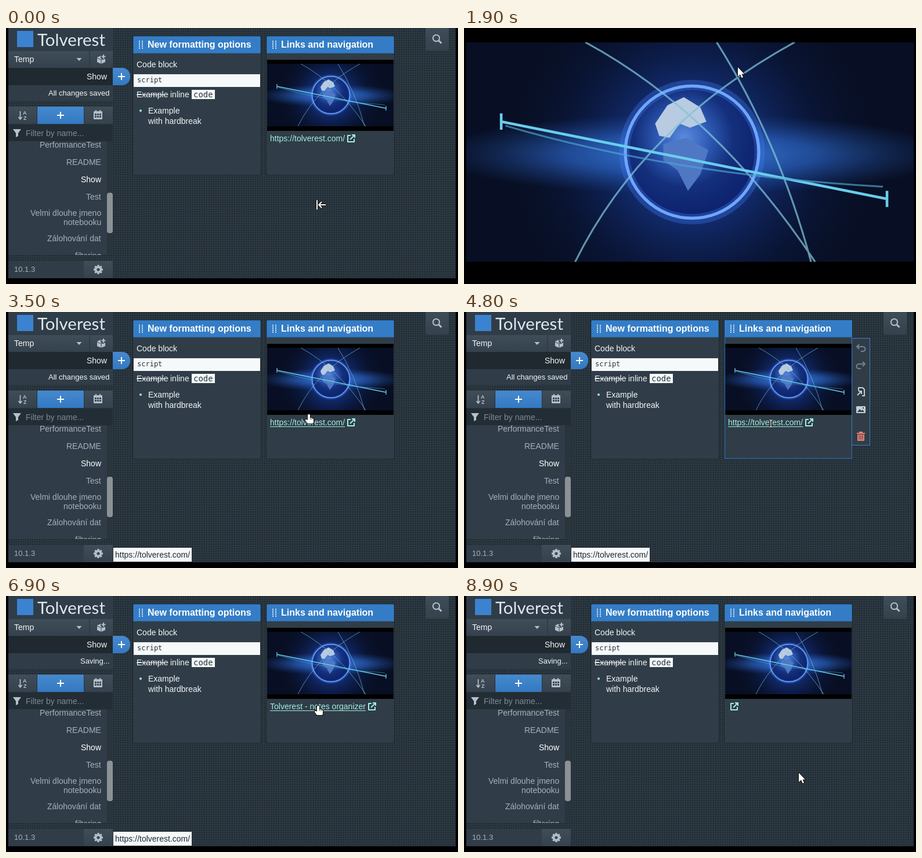
Write an HTML page with a canvas that moves like this. It is 779x443 px and loops after 9.8 s.

```html
<!DOCTYPE html>
<html lang="en">
<head>
<meta charset="utf-8">
<title>Notes</title>
<style>
html, body { margin: 0; width: 100%; height: 100%; overflow: hidden; background: #000; }
canvas { display: block; width: 779px; height: 443px; }
</style>
</head>
<body>
<canvas id="stage" width="779" height="443"></canvas>
<script>
const ctx = document.getElementById('stage').getContext('2d');
const LOOP = 9800, STEP = 100;
const SANS = '"Liberation Sans", Arial, sans-serif';
const MONO = '"DejaVu Sans Mono", monospace';
const URL_TEXT = 'https://tolverest.com/';
const C = {
  panel: '#303d48', button: '#3a4753', dark: '#20292f', blue: '#347dc6', text: '#f2f5f7',
  muted: '#a5b0b9', icon: '#b4c0ca', mint: '#a2eee0', paper: '#f5f9fa', red: '#e87f75'
};

// ---------- helpers ----------
function rect(x, y, w, h, fill, radius = 0) {
  ctx.fillStyle = fill;
  ctx.beginPath();
  ctx.roundRect(x, y, w, h, radius);
  ctx.fill();
}

function frame(x, y, w, h, color) {
  ctx.strokeStyle = color;
  ctx.lineWidth = 1;
  ctx.strokeRect(x + .5, y + .5, w - 1, h - 1);
}

function text(str, x, y, color = C.text, size = 14, align = 'left', family = SANS, weight = '') {
  ctx.font = `${weight} ${size}px ${family}`;
  ctx.fillStyle = color;
  const w = ctx.measureText(str).width;
  ctx.fillText(str, align === 'right' ? Math.round(x - w) : x, y);
  return w;
}

function shape(d, x, y, { fill, stroke, width = 2 }) {
  const path = new Path2D(d);
  ctx.save();
  ctx.translate(x, y);
  if (stroke) {
    ctx.strokeStyle = stroke;
    ctx.lineWidth = width;
    ctx.lineJoin = 'round';
    ctx.stroke(path);
  }
  if (fill) {
    ctx.fillStyle = fill;
    ctx.fill(path);
  }
  ctx.restore();
}

function ring(x, y, r, color, width) {
  ctx.strokeStyle = color;
  ctx.lineWidth = width;
  ctx.beginPath();
  ctx.arc(x, y, r, 0, 7);
  ctx.stroke();
}

function plus(x, y, color) {
  rect(x - 6, y - 1, 12, 2, color);
  rect(x - 1, y - 6, 2, 12, color);
}

function gear(x, y) {
  ctx.fillStyle = C.icon;
  for (let i = 0; i < 8; i++) {
    ctx.save();
    ctx.translate(x, y);
    ctx.rotate(i * Math.PI / 4);
    ctx.fillRect(-1.7, -8, 3.4, 5);
    ctx.restore();
  }
  ring(x, y, 4.4, C.icon, 3.6);
}

function magnifier(x, y) {
  ring(x - 1.5, y - 1.5, 5.6, C.icon, 2);
  shape('M3 3L7.5 7.5', x, y, { stroke: C.icon, width: 3 });
}

function raised(x, y, w, h, radius, top = '#3f4d59', bottom = '#35424d') {
  const g = ctx.createLinearGradient(0, y, 0, y + h);
  g.addColorStop(0, top);
  g.addColorStop(1, bottom);
  rect(x, y, w, h, g, radius);
}

function primary(x, y, w, h, radius) {
  raised(x, y, w, h, radius, '#4689ce', '#3379c2');
}

const dots = (() => {
  const tile = document.createElement('canvas');
  tile.width = tile.height = 4;
  const g = tile.getContext('2d');
  g.fillStyle = '#2c3841';
  g.fillRect(0, 0, 4, 4);
  g.fillStyle = '#1b242b';
  g.fillRect(1, 1, 2, 1);
  g.fillRect(1, 2, 1, 1);
  return ctx.createPattern(tile, 'repeat');
})();

// ---------- sidebar ----------
function sidebar(saving) {
  rect(4, 0, 181, 126, C.panel);
  rect(19, 5, 28, 28, '#3b83d0');
  text('Tolverest', 54, 31, '#dfe8f0', 29.5, 'left', 'Lato, sans-serif');

  raised(4, 40, 139, 29);
  text('Temp', 14, 59);
  shape('M-4.5 -2H4.5L0 3Z', 126, 54, { fill: C.icon });
  raised(145, 40, 39, 29);
  shape('M-7 -3L-1 -6V-2L3 1L7 -1V5L0 8L-7 5ZM-7 -3L0 0V8', 164, 54, { fill: C.icon });
  shape('M-7 -2L0 1V8M0 1L7 -2', 164, 54, { stroke: C.button, width: 1 });
  shape('M4 -8V-1M.5 -4.5H7.5', 164, 54, { stroke: C.icon });

  rect(4, 69, 180, 30, C.dark);
  text('Show', 174, 89, C.text, 14, 'right');
  primary(184, 69, 30, 30, [0, 14, 14, 0]);
  plus(199, 84, '#fff');
  text(saving ? 'Saving...' : 'All changes saved', 179, 117, C.text, 13, 'right');

  raised(4, 136, 49, 30);
  shape('M24.5 144V157M21.5 154L24.5 158L27.5 154', 0, 0, { stroke: C.icon, width: 1.7 });
  text('A', 29, 150, C.icon, 9, 'left', SANS, 'bold');
  text('Z', 30, 159, C.icon, 9, 'left', SANS, 'bold');
  primary(54, 136, 80, 30);
  plus(94, 151, '#fff');
  raised(135, 136, 49, 30);
  rect(151, 144, 15, 14, C.icon, 1);
  rect(154, 142, 2, 4, C.icon);
  rect(161, 142, 2, 4, C.icon);
  for (let i = 0; i < 6; i++) rect(153 + i % 3 * 4, 148 + (i / 3 | 0) * 4, 3, 3, C.button);

  rect(4, 167, 180, 29, '#232d35');
  shape('M-7 -6H7L2 1V6L-2 8V1Z', 19, 181, { fill: C.icon });
  text('Filter by name...', 34, 187, '#7f8a94');

  rect(4, 196, 180, 197, C.panel);
  ctx.save();
  ctx.beginPath();
  ctx.rect(4, 196, 180, 197);
  ctx.clip();
  const items = [['PerformanceTest', 207], ['README', 237], ['Show', 267], ['Test', 297],
    ['Velmi dlouhe jmeno', 325], ['notebooku', 341], ['Zálohování dat', 369], ['filtering', 399]];
  for (const [name, y] of items) text(name, 164, y, name === 'Show' ? '#fff' : C.muted, 14, 'right');
  ctx.restore();
  rect(174, 196, 10, 197, '#29343d');
  rect(174, 285, 10, 70, '#8b9195', 4);

  rect(4, 403, 130, 30, C.panel);
  text('10.1.3', 14, 422, C.muted, 13);
  raised(134, 403, 50, 30);
  gear(159, 418);
}

// ---------- cards ----------
function card(x, title) {
  rect(x - 1, 13, 222, 242, '#1c252c', 3);
  rect(x, 14, 220, 240, C.panel, 2);
  rect(x, 14, 220, 30, C.blue, [2, 2, 0, 0]);
  frame(x, 14, 220, 30, '#10161a33');
  for (let i = 0; i < 10; i++) rect(x + 10 + i % 2 * 5, 22 + (i >> 1) * 3, 2, 2, '#c9dff3');
  text(title, x + 25, 34, '#fff', 16, 'left', SANS, 'bold');
}

function formatCard() {
  card(219, 'New formatting options');
  text('Code block', 225, 68);
  rect(220, 80, 218, 22, C.paper);
  text('script', 226, 94, '#26323b', 12, 'left', MONO);
  const w = text('Example', 225, 120);
  rect(225, 115, w, 1, C.text);
  text('inline', 283, 120);
  rect(320, 107, 40, 16, C.paper);
  text('code', 323, 120, '#26323b', 14, 'left', MONO);
  rect(230, 141, 4, 4, C.mint, 2);
  text('Example', 245, 148);
  text('with hardbreak', 245, 166);
}

function glow(cx, cy, r, stops) {
  const g = ctx.createRadialGradient(cx, cy, 0, cx, cy, r);
  stops.forEach((color, i) => g.addColorStop(i / (stops.length - 1), color));
  return g;
}

// Night globe, drawn in a 218 x 123 box.
function picture(x, y, w, h) {
  ctx.save();
  ctx.translate(x, y);
  ctx.scale(w / 218, h / 123);
  rect(0, 0, 218, 123, '#000');
  ctx.beginPath();
  ctx.rect(0, 7, 218, 108);
  ctx.clip();
  rect(0, 7, 218, 108, '#080f24');
  rect(0, 7, 218, 108, glow(110, 62, 95, ['#1c4199', '#122c70', '#0b1a4488', '#080f2400']));
  ctx.save();
  ctx.translate(110, 62);
  ctx.scale(1, .16);
  rect(-110, -130, 220, 260, glow(0, 0, 125, ['#3f8ae8dd', '#2a62c0aa', '#1d489000']));
  ctx.restore();

  ctx.beginPath();
  ctx.arc(110, 61, 32, 0, 7);
  ctx.fillStyle = glow(106, 54, 36, ['#5c8bdc', '#2f5cb8', '#14307c', '#0e2470']);
  ctx.fill();
  shape('M92 47L98 38L106 34L114 39L117 46L109 49L104 47L99 54L94 53Z', 0, 0, { fill: '#b9cbe0' });
  shape('M96 57L107 54L118 60L114 72L108 80L103 70L96 65Z', 0, 0, { fill: '#4f78c4' });
  ring(110, 61, 33, '#3f78f055', 5);
  ring(110, 61, 32.5, '#6ea6fa', 1.5);
  shape('M58 7Q122 42 170 115M160 7Q86 48 53 115M122 7Q152 55 168 115',
    0, 0, { stroke: '#7fc4d8bb', width: .9 });
  shape('M17 46L205 84M17 42V50M205 80V88', 0, 0, { stroke: '#69cdec', width: 1.3 });
  shape('M19 48Q100 72 203 78', 0, 0, { stroke: '#4fa4d0aa', width: .9 });
  ctx.restore();
}

function zoomButton(hover) {
  rect(455, 55, 24, 24, hover ? '#4b5560' : '#252b33', 3);
  ring(465.5, 65.5, 5.5, '#c0c9d0', 1.7);
  shape('M465.5 62.5V68.5M462.5 65.5H468.5M469.5 69.5L473 73', 0, 0, { stroke: '#c0c9d0', width: 1.7 });
}

function outLink(x, y) {
  shape('M6 2H1V13H12V8M5 9L12 2M8 1H13V6', x, y, { stroke: C.mint, width: 2 });
}

function link(label, hover) {
  let w = 0;
  if (label) {
    w = text(label, 455, 196, C.mint);
    if (hover) rect(455, 198, w, 1, C.mint);
  }
  outLink(Math.round(455 + w + 4), 184);
}

function toolbar() {
  frame(449, 14, 220, 240, C.blue);
  rect(668, 45, 32, 186, C.panel);
  frame(668, 45, 32, 186, C.blue);
  const dim = { stroke: '#75818b', width: 2 };
  const back = 'M-3 -6L-7 -2L-3 2M-7 -2H3C9 -2 9 6 3 6H0';
  shape(back, 684, 62, dim);
  ctx.save();
  ctx.translate(684, 92);
  ctx.scale(-1, 1);
  shape(back, 0, 0, dim);
  ctx.restore();
  const line = { stroke: '#c4ced6', width: 2 };
  shape('M-4 -2V-7H3L6 -4V7H2M-6 6L1 -1M-4 -1H1V4', 684, 138, line);
  rect(676, 163, 16, 12, '#c4ced6', 1);
  shape('M-6 4L-2 -1L1 2L3 0L6 4Z', 684, 169, { fill: C.panel });
  rect(687, 165, 2, 2, C.panel);
  rect(677, 209, 14, 2, C.red);
  rect(681, 207, 6, 2, C.red);
  rect(678, 212, 12, 11, C.red, 1);
  for (let i = 0; i < 3; i++) rect(680.5 + i * 3, 213, 1, 8, C.panel);
}

function statusBar() {
  rect(185, 408, 135, 24, C.paper);
  text(URL_TEXT, 188, 425, '#1f2930');
}

function menu(x, active) {
  const rows = ['Open', 'Copy to clipboard', 'Icon only (toggle)', 'Download link info'];
  ctx.save();
  ctx.shadowColor = '#0008';
  ctx.shadowBlur = 5;
  rect(x, 190, 180, 161, '#29333b', 2);
  ctx.restore();
  if (active >= 0) rect(x, 190 + active * 30, 180, 30, '#3a454e');
  rows.forEach((row, i) => text(row, x + 7, 210 + i * 30));
  rect(x + 6, 315, 169, 1, '#4b565f');
  text('Remove link', x + 7, 341, C.red);
}

// ---------- pointer ----------
const track = [[200, 537, 304], [1200, 493, 72], [1600, 472, 68], [2800, 472, 68], [3600, 529, 193],
  [5200, 529, 193], [5400, 585, 293], [5600, 585, 293], [5700, 584, 295], [6100, 584, 295],
  [6900, 538, 190], [7500, 538, 190], [7700, 559, 222], [8100, 583, 268], [8700, 583, 268],
  [8900, 577, 306]];

function pointerAt(t) {
  const i = track.findIndex(k => k[0] > t);
  if (i === 0) return track[0].slice(1);
  if (i < 0) return track[track.length - 1].slice(1);
  const [t0, x0, y0] = track[i - 1], [t1, x1, y1] = track[i];
  const f = (t - t0) / (t1 - t0);
  return [x0 + (x1 - x0) * f, y0 + (y1 - y0) * f].map(Math.round);
}

const white = { fill: '#fff', stroke: '#111', width: 2 };
const pointers = {
  arrow: (x, y) => shape('M0 0V16L4 12.3L6.6 18.3L9 17.2L6.6 11.4H11Z', x, y, white),
  hand: (x, y) => {
    shape('M-2 1Q0 -1 2 1V6H4L6 7L8 8V14L7 16H-2L-6 11V9H-4L-2 10Z', x, y, white);
    shape('M2.5 6V9M5 7V9.5', x, y, { stroke: '#222', width: .8 });
  },
  beam: (x, y) => {
    const d = 'M-3 -6H-1L0 -5L1 -6H3M0 -5V5M-3 6H-1L0 5L1 6H3';
    shape(d, x, y, { stroke: '#111', width: 3 });
    shape(d, x, y, { stroke: '#fff', width: 1.2 });
  },
  edge: () => {
    const d = 'M536 298V314M539 306H551M544 301L539 306L544 311';
    shape(d, 0, 0, { stroke: '#111', width: 4 });
    shape(d, 0, 0, { stroke: '#fff', width: 2 });
  }
};

// ---------- scene ----------
function draw(t) {
  const during = (a, b) => t >= a && t < b;
  const [px, py] = pointerAt(t);
  const fetched = t >= 6300;
  const full = during(1900, 2500);
  const firstMenu = during(4900, 6000), secondMenu = during(7300, 8300);
  const focus = during(4800, 4900) || during(7100, 7300);
  const overLink = during(3500, 4900) || during(6800, 7300);
  const overImage = during(300, 3500) && py < 178;
  const overZoom = overImage && px < 479 && py < 79;

  rect(0, 0, 779, 443, '#000');
  if (full) {
    picture(4, 0, 771, 433);
  } else {
    rect(4, 0, 771, 433, dots);
    sidebar(fetched);
    raised(723, 0, 40, 39, [0, 0, 3, 3]);
    magnifier(743, 19);
    formatCard();
    card(449, 'Links and navigation');
    picture(450, 55, 218, 123);
    if (overImage) zoomButton(overZoom && !during(1800, 1900));
    const label = t >= 8400 ? '' : fetched ? 'Tolverest - notes organizer' : URL_TEXT;
    link(label, overLink);
    if (focus) toolbar();
    if (overLink) statusBar();
    if (firstMenu || secondMenu) menu(firstMenu ? 528 : 538, Math.min(3, Math.floor((py - 190) / 30)));
  }

  let kind = 'arrow';
  if (t < 100) kind = 'edge';
  else if (focus) kind = 'beam';
  else if (overLink || firstMenu || during(7300, 8800) || (overZoom && t < 1900)) kind = 'hand';
  pointers[kind](px, py);
}

function tick() {
  const t = performance.now() % LOOP;
  draw(Math.floor(t / STEP) * STEP);
  requestAnimationFrame(tick);
}
tick();
</script>
</body>
</html>
```
